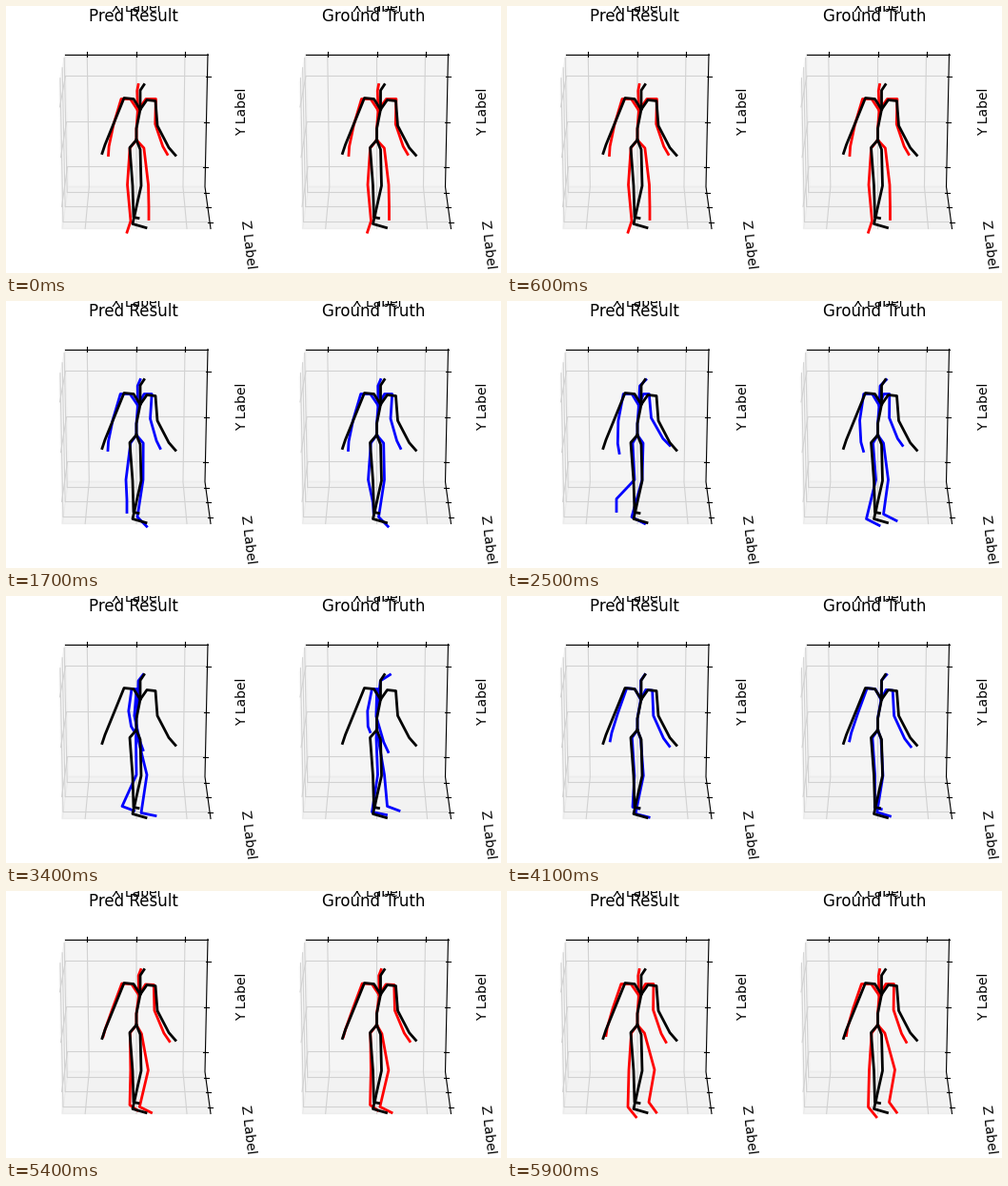
These frames come from a looping animation (520 px wide and 280 px high, 6000 ms). A matplotlib script:

```python
import numpy as np
import matplotlib.pyplot as plt
from matplotlib.animation import FuncAnimation

W, H, DPI = 520, 280, 100
FRAMES, STEP_MS = 60, 100
RED_START, BLUE_START = 48, 13
PANELS = [(-0.5, "Pred Result"), (252, "Ground Truth")]

plt.rcParams["font.family"] = "DejaVu Sans"

# The resting body, limb by limb
HEAD = [(145, 82), (141, 88), (141, 108)]
L_ARM = [(134, 97), (124, 96), (113, 123), (104, 145), (101, 154)]
R_ARM = [(148, 98), (157, 99), (159, 125), (171, 148), (178, 156)]
L_LEG = [(130, 148), (133, 188), (134, 221), (139, 222)]
R_LEG = [(141, 150), (142, 188), (133, 228), (147, 232)]
SPINE = [(137, 128), (137, 140)]
LIMBS = [
    [0, 1, 2, 21, 22],
    [2, 3, 4, 5, 6, 7],
    [2, 8, 9, 10, 11, 12],
    [22, 13, 14, 15, 16],
    [22, 17, 18, 19, 20],
]


def stack(*parts):
    return np.vstack(parts).astype(float)


def arm(side, yaw, neck, hand, rest_arm):
    """Collar and shoulder follow the turn; the rest follows the hand."""
    shoulder = np.array([138.5 - 4 * np.sin(yaw) + side * 18.5 * np.cos(yaw), 97])
    collar = (neck[0] + 0.45 * (shoulder[0] - neck[0]), 97)
    chain = np.array(rest_arm[1:], float)
    pull = np.array([[0], [0.3], [0.75], [1]])
    chain += (1 - pull) * (shoulder - chain[0]) + pull * (hand - chain[-1])
    return stack(collar, chain)


def leg(side, yaw, knee, ankle):
    """The foot points where the body faces, and hangs when it is lifted."""
    hip = (137.5 + side * 7.5 * np.cos(yaw), 148.5)
    aim = np.clip(1.5 * yaw, -np.pi / 2, np.pi / 2)
    lift = np.clip((222 - ankle[1]) / 12, 0, 1)
    drop = 3 + 9 * np.cos(aim)
    toe = (ankle[0] + 15 * np.sin(aim) * (1 - lift),
           ankle[1] + drop + (13 - drop) * lift)
    return stack(hip, (knee, 187), ankle, toe)


def body(yaw, top, hands, knees, ankles):
    yaw = np.radians(yaw)
    neck = (138.5, 109)
    head = [(top, 82), (138 + 0.25 * (top - 140), 88.5), neck]
    return stack(head,
                 arm(-1, yaw, neck, hands[0], L_ARM), arm(1, yaw, neck, hands[1], R_ARM),
                 leg(-1, yaw, knees[0], ankles[0]), leg(1, yaw, knees[1], ankles[1]),
                 SPINE)


def track(keys):
    """Monotone cubic path through (frame, joints) keys, wrapped over the loop."""
    t = np.array([k for k, _ in keys], float)
    p = np.array([q for _, q in keys])
    t = np.concatenate([t - FRAMES, t, t + FRAMES])
    p = np.concatenate([p, p, p])
    h = np.diff(t)
    slope = np.diff(p, axis=0) / h[:, None, None]
    prod = slope[:-1] * slope[1:]
    same = prod > 0
    m = np.zeros_like(p)
    m[1:-1] = np.where(same, 2 * prod / np.where(same, slope[:-1] + slope[1:], 1), 0)
    path = []
    for f in range(FRAMES):
        i = np.searchsorted(t, f, side="right") - 1
        u = (f - t[i]) / h[i]
        path.append((1 + 2 * u) * (1 - u) ** 2 * p[i] + u * (1 - u) ** 2 * h[i] * m[i]
                    + u * u * (3 - 2 * u) * p[i + 1] + u * u * (u - 1) * h[i] * m[i + 1])
    return path


rest = stack(HEAD, L_ARM, R_ARM, L_LEG, R_LEG, SPINE)
stride = body(-10, 139, [(107.5, 156), (169.5, 155)], (127.5, 149.5), [(131, 225), (150, 210)])
lift = body(23, 139, [(104, 151), (167, 158)], (128, 155), [(127, 226), (149, 221)])

# What the body really does, then how the prediction strays from it
step = dict(yaw=27, top=141, hands=[(107, 156), (162, 154)],
            knees=(128, 145), ankles=[(133, 211), (139, 226)])
turn = dict(yaw=43, top=146, hands=[(122, 157), (163, 151)],
            knees=(135, 148), ankles=[(125, 228), (143, 223)])
side = dict(yaw=82, top=151, hands=[(130, 142), (149, 163)],
            knees=(138, 145), ankles=[(132, 226), (148, 220)])
step_guess = dict(step, knees=(126, 144), ankles=[(127, 208), (138, 226)])
turn_guess = dict(turn, hands=[(118, 159), (171, 151)],
                  knees=(134, 142), ankles=[(115, 207), (131, 226)])
side_guess = dict(side, top=144, hands=[(135, 142), (144, 161)],
                  knees=(137, 148), ankles=[(122, 220), (142, 227)])


def walk(*middle):
    poses = [body(**p) for p in middle]
    return track([(0, stride), (6, stride), *zip((17, 25, 34), poses),
                  (44, rest), (RED_START, rest), (59, lift)])


true_path = walk(step, turn, side)
guess_path = walk(step_guess, turn_guess, side_guess)
# Both panels share the observed part, then drift apart
for f in range(17):
    u = np.clip((f - BLUE_START + 1) / 4, 0, 1)
    guess_path[f] = (1 - u) * true_path[f] + u * guess_path[f]

fig = plt.figure(figsize=(W / DPI, H / DPI), dpi=DPI, facecolor="white")
ax = fig.add_axes([0, 0, 1, 1])
ax.set_xlim(-0.5, W - 0.5)
ax.set_ylim(H - 0.5, -0.5)
ax.axis("off")


def mix(a, b, u):
    return tuple(p + (q - p) * u for p, q in zip(a, b))


def stroke(dx, points, color, width, **kw):
    x, y = zip(*points)
    return ax.plot(np.array(x) + dx, y, color=color, lw=width, **kw)[0]


def draw_box(dx, title):
    # Corners: left/right, then back top, back bottom, front bottom, front top
    l_bt, l_bb, l_fb, l_ft = (62, 50), (65, 189), (59, 233), (56, 80)
    r_bt, r_bb, r_fb = (212, 50), (209, 189), (215, 233)
    for corners, shade in [((l_bt, l_bb, l_fb, l_ft), 0.95),
                           ((l_bb, r_bb, r_fb, l_fb), 0.90),
                           ((l_bt, r_bt, r_bb, l_bb), 0.925)]:
        ax.add_patch(plt.Polygon([(x + dx, y) for x, y in corners],
                                 fc=(shade,) * 3, ec=(shade,) * 3, alpha=0.5, lw=1))

    grid = dict(color="#d2d2d2", width=0.8, zorder=2, snap=False)
    axis = dict(color="black", width=0.8, zorder=3)

    def side_tick(point):
        x, y = point
        stroke(dx, [(x - 2, y), (x + 3, y)], **axis)

    for u in (0.155, 0.5, 0.84):
        top = mix(l_bt, r_bt, u)
        stroke(dx, [top, mix(l_bb, r_bb, u), mix(l_fb, r_fb, u)], **grid)
        stroke(dx, [(top[0], 47), (top[0], 52)], **axis)
    for y in (73, 121, 168):
        u = (y - 50) / 139
        right = mix(r_bt, r_bb, u)
        stroke(dx, [right, mix(l_bt, l_bb, u), mix(l_ft, l_fb, u)], **grid)
        side_tick(right)
    for y in (195, 210, 226):
        u = (y - 189) / 44
        right = mix(r_bb, r_fb, u)
        stroke(dx, [right, mix(l_bb, l_fb, u), mix(l_bt, l_ft, u)], **grid)
        side_tick(right)
    stroke(dx, [l_bt, r_bt], **axis)
    stroke(dx, [r_bt, r_bb, r_fb], **axis)

    ax.text(134 + dx, 16, title, size=12, ha="center", va="baseline")
    ax.text(137 + dx, 6, "X Label", size=10, ha="center", va="baseline")
    ax.text(248.5 + dx, 110, "Y Label", size=10, ha="center", va="center", rotation=90)
    ax.text(254 + dx, 250, "Z Label", size=10, ha="center", va="center", rotation=-83)


def draw_figure(dx, joints, color, z):
    return [stroke(dx, joints[limb], color, 2, zorder=z, solid_joinstyle="round")
            for limb in LIMBS]


panels = []
for (dx, title), path in zip(PANELS, (guess_path, true_path)):
    draw_box(dx, title)
    panels.append((dx, path, draw_figure(dx, path[0], "red", 4)))
    draw_figure(dx, rest, "black", 5)


def update(frame):
    color = "blue" if BLUE_START <= frame < RED_START else "red"
    for dx, path, lines in panels:
        for line, limb in zip(lines, LIMBS):
            x, y = path[frame][limb].T
            line.set_data(x + dx, y)
            line.set_color(color)
    return [line for panel in panels for line in panel[2]]


anim = FuncAnimation(fig, update, frames=FRAMES, interval=STEP_MS,
                     repeat=True, repeat_delay=0, blit=False)
plt.show()
```
